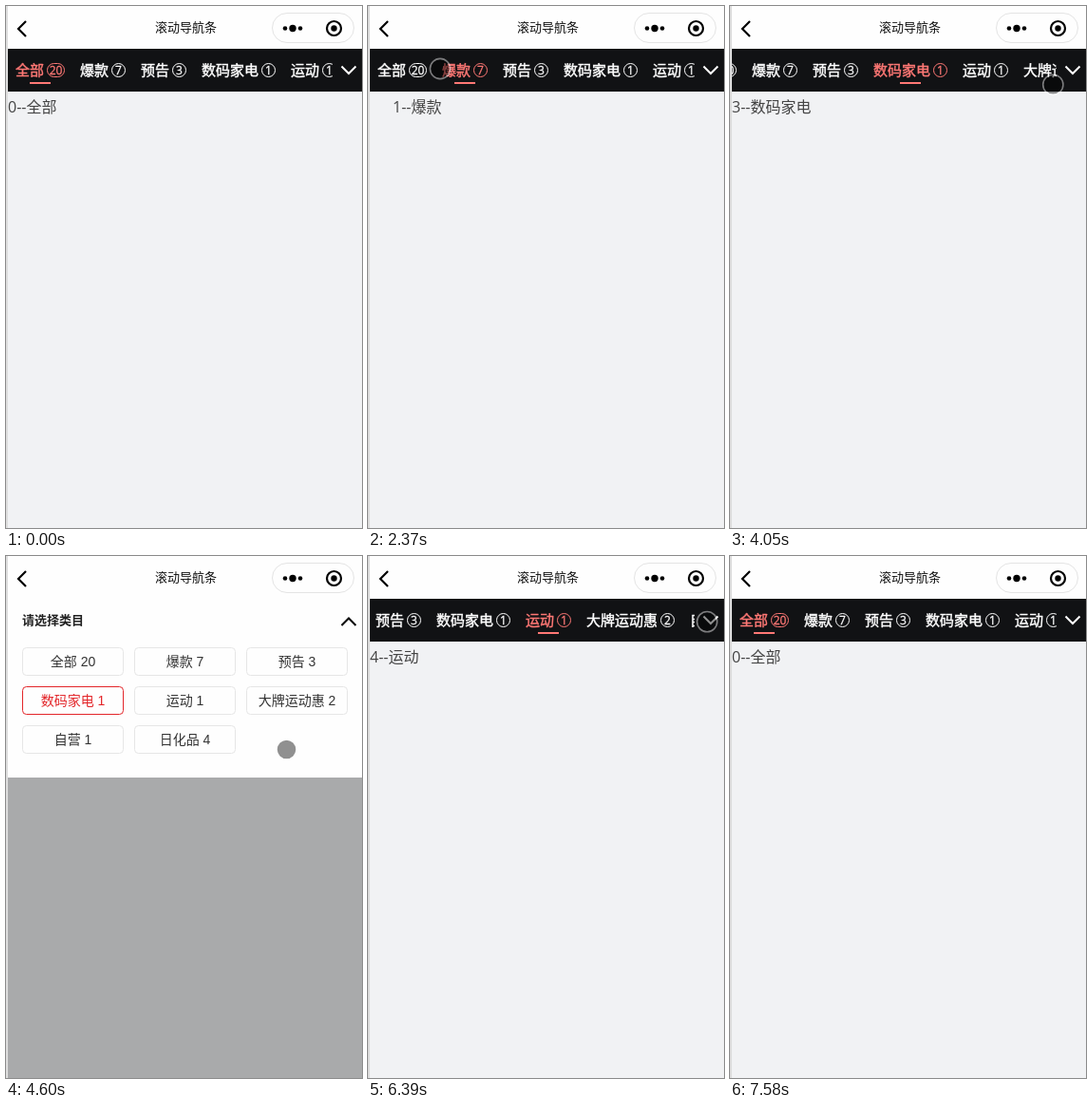
An HTML page with a canvas for the animation above (8.22 s loop, 375 px wide and 549 px high).

```html
<!DOCTYPE html>
<html lang="zh-CN">
<head>
<meta charset="utf-8">
<title>滚动导航条</title>
<style>
  html, body { margin: 0; width: 100%; height: 100%; overflow: hidden; background: #fff; }
  canvas { display: block; width: 375px; height: 549px; }
</style>
</head>
<body>
<canvas id="stage"></canvas>
<script>
const W = 375, H = 549, LOOP = 8220, LEFT = 2, PAGE = W - LEFT;
const CORAL = '#ff7875', RED = '#e3262a', NAV = '#111214';
const CJK = '"Noto Sans CJK SC", "Noto Sans CJK", sans-serif';
const HUMANIST = '"Open Sans", ' + CJK;
const GROTESK = '"Liberation Sans", ' + CJK;

const canvas = document.getElementById('stage');
const ctx = canvas.getContext('2d');
const ratio = window.devicePixelRatio || 1;
canvas.width = W * ratio;
canvas.height = H * ratio;

const categories = [['全部', 20], ['爆款', 7], ['预告', 3], ['数码家电', 1],
  ['运动', 1], ['大牌运动惠', 2], ['自营', 1], ['日化品', 4]];

let nextX = 10;
const tabs = categories.map(([name, count]) => {
  const x = nextX, badgeX = x + name.length * 15 + 3, badgeW = count > 9 ? 19 : 15;
  nextX = badgeX + badgeW + 16;
  return { name, count, x, badgeX, badgeW, center: (x + badgeX + badgeW) / 2 };
});

const buttonAt = i => ({ x: 17 + (i % 3) * 118, y: 96 + Math.floor(i / 3) * 41 });

// The screen refreshes in evenly spaced steps inside these spans and rests between them.
const spans = [[0, 0], [990, 1950], [2070, 3080], [3200, 4200], [4600, 5320],
  [5600, 6540], [6660, 7060], [7310, 7580]];

const slides = [
  { at: 0, page: 0 }, { at: 2060, page: 1 }, { at: 3064, page: 2 },
  { at: 3575, page: 3 }, { at: 5477, page: 4 }, { at: 7080, page: 0 },
];
const panelOpenings = [4600, 6300];

const CHEVRON = [358, 69];
const gestures = [
  { at: 990, to: [341, 451] },
  { at: 1538, to: [300, 76] },
  { at: 1950, to: [76, 66] },
  { at: 2500, to: [76, 66] },
  { at: 3080, to: [tabs[2].center, 68] },
  { at: 3200, to: [190.5, 240.5] },
  { at: 3343, to: [240, 257] },
  { at: 3629, to: [126, 250] },
  { at: 4200, to: CHEVRON },
  { at: 4600, to: [295.5, 203.5] },
  { at: 5320, to: [188, 152] },
  { at: 5600, to: [217.5, 111.5] },
  { at: 6000, to: CHEVRON },
  { at: 6270, to: CHEVRON },
  { at: 7060, to: [71.5, 106.5] },
];
const CURSOR_GONE = 7580;

function refreshTime(time) {
  const [start, end] = spans.filter(span => span[0] <= time).pop();
  if (time >= end) return end;
  const gap = (end - start) / Math.round((end - start) / 137);
  return start + Math.floor((time - start) / gap + 0.1) * gap;
}

function slideState(t) {
  const i = slides.filter(slide => slide.at <= t).length - 1;
  const { at, page } = slides[i];
  const from = i ? slides[i - 1].page : page;
  const p = Math.min(1, (t - at) / 500);
  return { at, selected: page, position: from + (page - from) * (1 - (1 - p) ** 3) };
}

function cursorAt(t) {
  if (t < gestures[0].at || t >= CURSOR_GONE) return null;
  const i = gestures.findIndex(gesture => gesture.at > t);
  if (i < 0) return gestures[gestures.length - 1].to;
  const a = gestures[i - 1], b = gestures[i];
  const p = Math.sin((t - a.at) / (b.at - a.at) * Math.PI / 2);
  return a.to.map((v, axis) => v + (b.to[axis] - v) * p);
}

function rect(x, y, w, h, color) {
  ctx.fillStyle = color;
  ctx.fillRect(x, y, w, h);
}

function text(str, x, y, font, color, align = 'left', weight = 0) {
  ctx.font = font;
  ctx.fillStyle = ctx.strokeStyle = color;
  ctx.textAlign = align;
  ctx.fillText(str, x, y);
  if (weight) {
    ctx.lineWidth = weight;
    ctx.strokeText(str, x, y);
  }
}

function line(points, color, width) {
  ctx.beginPath();
  points.forEach(([x, y]) => ctx.lineTo(x, y));
  ctx.strokeStyle = color;
  ctx.lineWidth = width;
  ctx.stroke();
}

function chevron(y, tipY, color) {
  line([[353.5, y], [361, tipY], [368.5, y]], color, 2);
}

function outline(x, y, w, h, r, color) {
  ctx.beginPath();
  ctx.roundRect(x + 0.5, y + 0.5, w - 1, h - 1, r);
  ctx.strokeStyle = color;
  ctx.lineWidth = 1;
  ctx.stroke();
}

function disc(x, y, r, color) {
  ctx.beginPath();
  ctx.arc(x, y, r, 0, Math.PI * 2);
  ctx.fillStyle = color;
  ctx.fill();
}

function ring(x, y, r, color, width) {
  ctx.beginPath();
  ctx.arc(x, y, r, 0, Math.PI * 2);
  ctx.strokeStyle = color;
  ctx.lineWidth = width;
  ctx.stroke();
}

function drawHeader() {
  rect(0, 0, W, 45, '#fefefe');
  line([[21, 16], [13, 24], [21, 32]], '#000', 2.2);
  text('滚动导航条', 189.5, 27, '13px ' + CJK, '#111', 'center');
  outline(280, 7, 87, 32, 15.5, '#e4e4e4');
  [-1, 0, 1].forEach(i => disc(302 + i * 8, 23.5, i ? 2.3 : 3.7, '#000'));
  ring(345.5, 23.5, 7.5, '#000', 2.2);
  disc(345.5, 23.5, 3.2, '#000');
}

function drawTabs(selected) {
  rect(0, 45, W, 45, NAV);
  ctx.save();
  ctx.beginPath();
  ctx.rect(LEFT, 45, 342, 45);
  ctx.clip();
  ctx.translate(-Math.max(0, Math.round(tabs[selected].center - 190)), 0);
  tabs.forEach((tab, i) => {
    const color = i === selected ? CORAL : '#fff';
    text(tab.name, tab.x, 73, '15px ' + CJK, color, 'left', 0.45);
    outline(tab.badgeX, 60, tab.badgeW, 15, 7, color);
    text(tab.count, tab.badgeX + tab.badgeW / 2, 72, '12px ' + HUMANIST, color, 'center', 0.3);
    if (i === selected) rect(Math.round(tab.center) - 11, 80, 22, 2, CORAL);
  });
  ctx.restore();
  chevron(63.5, 71, '#fff');
}

function drawPages(position) {
  rect(0, 90, W, H - 90, '#f1f2f4');
  categories.forEach(([name], i) =>
    text(`${i}--${name}`, LEFT + Math.round((i - position) * PAGE), 112, '16px ' + HUMANIST, '#444'));
}

function drawPanel(selected) {
  rect(0, 45, W, 188, '#fefefe');
  rect(0, 233, W, H - 233, '#a9aaab');
  text('请选择类目', 17, 72, 'bold 13px ' + CJK, '#222');
  chevron(73, 65.5, '#000');
  categories.forEach(([name, count], i) => {
    const { x, y } = buttonAt(i), active = i === selected;
    outline(x, y, 107, 30, 4, active ? RED : '#e6e6e6');
    text(`${name} ${count}`, x + 53.5, y + 20, '14px ' + GROTESK, active ? RED : '#333', 'center');
  });
}

function drawCursor([x, y]) {
  disc(x, y, 9.8, 'rgba(0,0,0,.43)');
  ring(x, y, 10.6, 'rgba(255,255,255,.45)', 1.6);
}

function draw(time) {
  const t = refreshTime(time);
  const { at, selected, position } = slideState(t);
  const cursor = cursorAt(t);
  ctx.setTransform(ratio, 0, 0, ratio, 0, 0);
  drawHeader();
  // A choice in the panel closes it.
  if (panelOpenings.some(opening => opening <= t && opening > at)) {
    drawPanel(selected);
  } else {
    drawPages(position);
    drawTabs(selected);
  }
  rect(0, 0, LEFT, H, '#dedede');
  if (cursor) drawCursor(cursor);
}

const begin = performance.now();
function frame() {
  draw((performance.now() - begin) % LOOP);
  requestAnimationFrame(frame);
}
frame();
</script>
</body>
</html>
```
